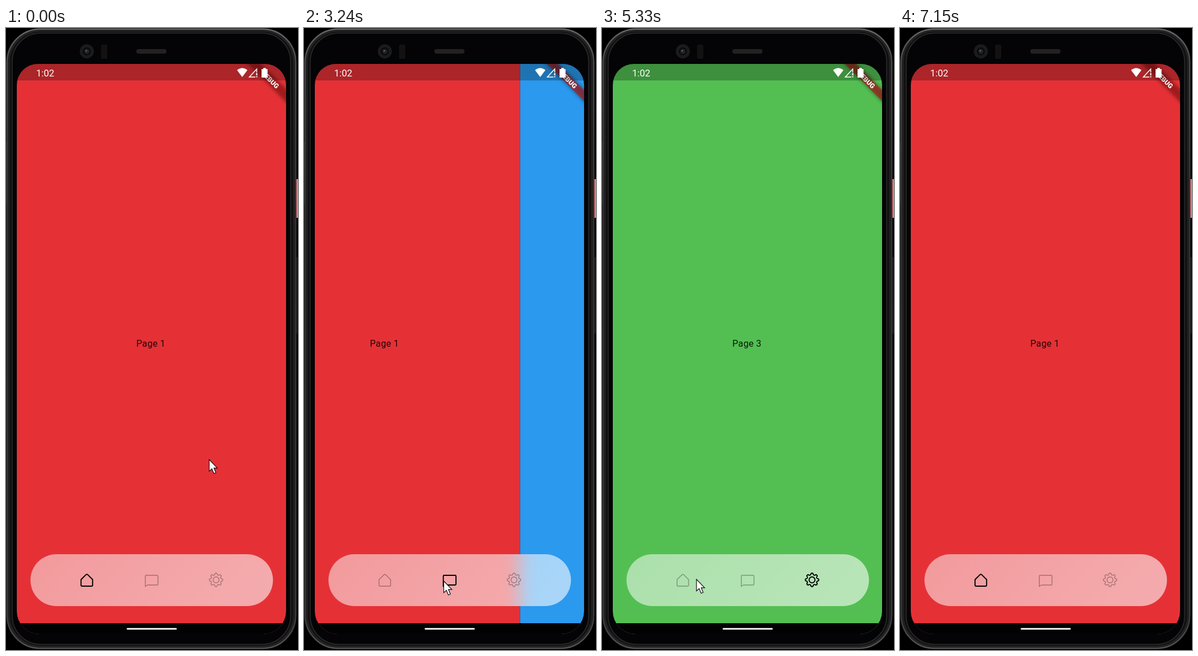
Recreate the animation shown at these times as an HTML page. Size 513x1091 px, loop 7180 ms.

```html
<!DOCTYPE html>
<html lang="en">
<head>
<meta charset="utf-8">
<title>Page navigation</title>
<style>
html, body { margin: 0; width: 100%; height: 100%; overflow: hidden; background: #000; }
svg { display: block; width: 513px; height: 1091px; }
text { font-family: Roboto, sans-serif; }
.label { font-size: 16.1px; letter-spacing: .29px; fill: #000; fill-opacity: .87; }
.icon { fill: none; stroke: #000; stroke-opacity: .33; stroke-width: 1.4; stroke-linejoin: round; }
.icon.on { stroke-opacity: 1; stroke-width: 1.9; }
</style>
</head>
<body>
<svg viewBox="0 0 513 1091">
  <defs>
    <linearGradient id="rim" x1="0" y1="0" x2="0" y2="1">
      <stop offset="0" stop-color="#686868"/>
      <stop offset=".05" stop-color="#4c4c4c"/>
      <stop offset=".3" stop-color="#343434"/>
      <stop offset=".95" stop-color="#3c3c3c"/>
      <stop offset="1" stop-color="#555"/>
    </linearGradient>
    <linearGradient id="glass" x1="0" y1="0" x2="1" y2=".2">
      <stop offset="0" stop-color="#fff" stop-opacity=".51"/>
      <stop offset="1" stop-color="#fff" stop-opacity=".59"/>
    </linearGradient>
    <filter id="blur" filterUnits="userSpaceOnUse" x="-40" y="860" width="600" height="220" color-interpolation-filters="sRGB">
      <feGaussianBlur stdDeviation="15"/>
    </filter>
    <filter id="shade" x="-20%" y="-80%" width="140%" height="260%">
      <feGaussianBlur stdDeviation="3.5"/>
    </filter>
    <clipPath id="screen">
      <path d="M19 100a37 37 0 0 1 37-37H455a37 37 0 0 1 37 37V1023a40 40 0 0 1-40 40H59a40 40 0 0 1-40-40Z"/>
    </clipPath>
    <clipPath id="bar"><rect x="43" y="923" width="426" height="91" rx="45.5"/></clipPath>
  </defs>

  <!-- phone body -->
  <rect width="513" height="1091"/>
  <rect x="508" y="265" width="5" height="68" fill="#ee7477"/>
  <rect x="510" y="402" width="3" height="134" fill="#141414"/>
  <rect x="0" y="200" width="2" height="110" fill="#191919"/>
  <rect x="2" y="2" width="507" height="1086" rx="58" fill="#111" stroke="url(#rim)" stroke-width="2.5"/>
  <rect x="5" y="5" width="501" height="1080" rx="55" fill="none" stroke="#232323" stroke-width="3"/>
  <rect x="11" y="9" width="489" height="1072" rx="50" fill="#040406" stroke="#2b2b2b" stroke-width="1.5"/>
  <circle cx="142" cy="41" r="12.5" fill="#1b1b1c"/>
  <circle cx="142" cy="41" r="7" fill="#0a0a0c"/>
  <circle cx="142" cy="41" r="4.5" fill="#202429"/>
  <circle cx="141" cy="40" r="1.3" fill="#666b70"/>
  <rect x="167" y="29" width="11" height="25" rx="3" fill="#121213"/>
  <rect x="229" y="37" width="53" height="8" rx="4" fill="#222"/>

  <g clip-path="url(#screen)">
    <g id="pages">
      <rect x="-500" y="63" width="993" height="1000" fill="#e53136"/>
      <rect x="493" y="63" width="474" height="1000" fill="#2b99ee"/>
      <rect x="967" y="63" width="1000" height="1000" fill="#53bf52"/>
      <text class="label" x="229" y="559">Page 1</text>
      <text class="label" x="703" y="559">Page 2</text>
      <text class="label" x="1177" y="559">Page 3</text>
    </g>
    <g clip-path="url(#bar)">
      <g filter="url(#blur)"><use href="#pages"/></g>
      <rect x="43" y="923" width="426" height="91" fill="url(#glass)"/>
    </g>
    <g transform="translate(492 63) rotate(45)">
      <rect x="-60" y="32.3" width="120" height="13.8" fill-opacity=".5" filter="url(#shade)"/>
      <rect x="-60" y="32.3" width="120" height="13.8" fill="#b71c1c" fill-opacity=".63"/>
      <text y="43.4" text-anchor="middle" font-size="11.75" font-weight="900" fill="#fff">DEBUG</text>
    </g>
    <rect x="19" y="63" width="474" height="29" fill-opacity=".25"/>
    <rect x="19" y="1044" width="474" height="20" fill="#020202"/>
  </g>

  <!-- status bar -->
  <g fill="#fff">
    <text x="53" y="85" font-size="16.5">1:02</text>
    <path d="M406 74Q415 66.500 424 74L415 86Z"/>
    <path d="M438 86H427.500L440.500 72V78" fill="none" stroke="#fff" stroke-width="1.5"/>
    <path d="M439.500 79h2v4h-2zM439.500 84.500h2v2h-2z"/>
    <path d="M452 70h4.500v2H459.500V87H449V72h3Z"/>
  </g>
  <rect x="212" y="1052.500" width="88" height="2.800" rx="1.400" fill="#fff"/>

  <path class="icon" d="M131.800 967.500L140.500 958.900Q142 957.500 143.500 958.900L152.200 967.500V977Q152.200 979 150.200 979H133.800Q131.800 979 131.800 977Z"/>
  <path class="icon" d="M244.700 979.500V961.500Q244.700 960 246.200 960H265.500Q267 960 267 961.500V975.500Q267 977 265.500 977H248.500Z"/>
  <path class="icon" id="gear"/>
  <path id="cursor" d="M0 0V20.500L4.700 16.200L8.200 24.500L11.700 23L8.300 14.800H14.300Z" fill="#fff" stroke="#111" stroke-width="1.200"/>
</svg>
<script>
const LOOP = 7180, PAGE = 474, SLIDE = 480;
const $ = id => document.getElementById(id);
const icons = document.querySelectorAll('.icon');

// start time, page left, page reached
const slides = [[3157, 0, 1], [4464, 1, 2], [5743, 2, 0]];
// time, x, y of the pointer tip
const stops = [
  [0, 357, 757], [2760, 357, 757], [3120, 245.5, 970], [3900, 245.5, 970],
  [4400, 369, 968], [5329, 369, 968], [5330, 166, 967], [5600, 138, 960],
  [6390, 138, 960], [7060, 516, 790], [LOOP, 516, 790]
];

let gear = '';
for (let i = 0; i < 128; i++) {
  const a = i / 64 * Math.PI;
  const r = 10.4 + 1.4 * Math.tanh(2 * Math.cos(8 * a));
  gear += `${i ? 'L' : 'M'}${369 + r * Math.cos(a)} ${968 + r * Math.sin(a)}`;
}
$('gear').setAttribute('d', gear + 'ZM374.200 968a5.200 5.200 0 1 0-10.400 0a5.200 5.200 0 1 0 10.400 0');

const bezier = (a, b, s) => 3 * (1 - s) * s * (a * (1 - s) + b * s) + s ** 3;

// cubic-bezier(.25, .1, .25, 1)
function ease(t) {
  let lo = 0, hi = 1;
  for (let i = 0; i < 20; i++) {
    const mid = (lo + hi) / 2;
    if (bezier(.25, .25, mid) < t) lo = mid; else hi = mid;
  }
  return bezier(.1, 1, lo);
}

function pointer(t) {
  const i = stops.findIndex(s => s[0] > t);
  const [t0, x0, y0] = stops[i - 1], [t1, x1, y1] = stops[i];
  const u = (t - t0) / (t1 - t0), k = u * u * (3 - 2 * u);
  return [x0 + (x1 - x0) * k, y0 + (y1 - y0) * k];
}

function draw(now) {
  const t = now % LOOP;
  let page = 0, active = 0;
  for (const [start, from, to] of slides) {
    if (t < start) break;
    active = to;
    page = from + (to - from) * ease(Math.min(1, (t - start) / SLIDE));
  }
  $('pages').setAttribute('transform', `translate(${-PAGE * page} 0)`);
  icons.forEach((icon, i) => icon.classList.toggle('on', i === active));
  $('cursor').setAttribute('transform', `translate(${pointer(t)})`);
}

const begin = performance.now();
function tick() {
  draw(performance.now() - begin);
  requestAnimationFrame(tick);
}
tick();
</script>
</body>
</html>
```
